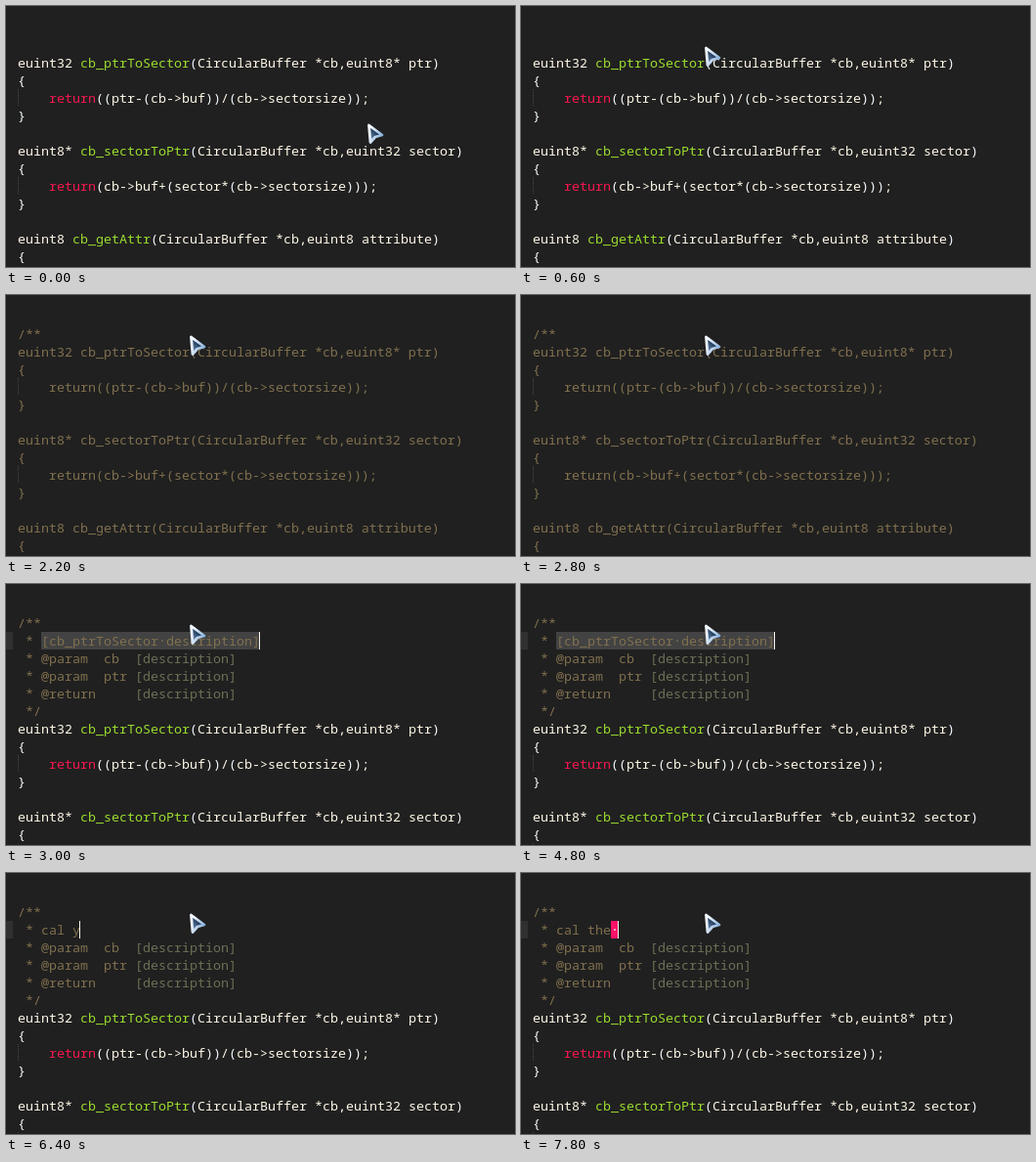
An HTML page for the animation above (8000 ms loop, 521 px wide and 267 px high).

```html
<!DOCTYPE html>
<html lang="en">
<head>
<meta charset="utf-8">
<title>Doc comment typing</title>
<style>
  html, body { margin: 0; width: 100%; height: 100%; overflow: hidden; background: #202020; }
  svg { display: block; width: 521px; height: 267px; }
  text {
    font: 13.3333px "Noto Sans Mono", "DejaVu Sans Mono", monospace;
    font-variant-ligatures: none;
    white-space: pre;
  }
</style>
</head>
<body>
<svg viewBox="0 0 521 267">
  <defs>
    <linearGradient id="rim" x1="0" y1="0.3" x2="1" y2="0.8">
      <stop offset="0.1" stop-color="#f3f8ff"/>
      <stop offset="1" stop-color="#7fa9d8"/>
    </linearGradient>
    <linearGradient id="core" x1="0.8" y1="0.2" x2="0.2" y2="1">
      <stop offset="0.2" stop-color="#0f2846"/>
      <stop offset="1" stop-color="#7d9fc6"/>
    </linearGradient>
  </defs>
  <rect width="521" height="267" fill="#202020"/>
  <g id="editor"></g>
  <g id="pointer">
    <path d="M2.5 2 L16 12 L9 14 L4 19.5 Z" fill="url(#core)"
      stroke="url(#rim)" stroke-width="2.8" stroke-linejoin="round"/>
  </g>
</svg>
<script>
const LOOP = 8000, LEFT = 12, TOP = 31, CHAR = 8, ROW = 18, BASELINE = 14;
const COLOR = {
  plain: '#fff8e8', bracket: '#f6fbff', name: '#9bdc2f', keyword: '#f9164f',
  comment: '#80704e', note: '#6c7056',
  select: '#434343', trailing: '#fc1268', guide: '#484848', gutter: '#303030'
};

const code = [
  'euint32 cb_ptrToSector(CircularBuffer *cb,euint8* ptr)',
  '{',
  '    return((ptr-(cb->buf))/(cb->sectorsize));',
  '}',
  '',
  'euint8* cb_sectorToPtr(CircularBuffer *cb,euint32 sector)',
  '{',
  '    return(cb->buf+(sector*(cb->sectorsize)));',
  '}',
  '',
  'euint8 cb_getAttr(CircularBuffer *cb,euint8 attribute)',
  '{'
];
const placeholder = '[cb_ptrToSector description]';
const docBlock = summary => [
  '/**',
  ' * ' + summary,
  ' * @param  cb  [description]',
  ' * @param  ptr [description]',
  ' * @return     [description]',
  ' */'
];

// Each step overrides the state left by the steps before it.
const steps = [
  { at: 0, pointer: [369, 120], head: '', doc: null, caret: 0, gutter: false },
  { at: 200, pointer: [202, 64] },
  { at: 400, pointer: [187, 48] },
  { at: 600, pointer: [187, 41] },
  { at: 800, caret: 1, gutter: true },
  { at: 1200, caret: 0 },
  { at: 1600, head: '/', caret: 1 },
  { at: 2200, head: '/**', caret: 0, gutter: false },
  { at: 2400, caret: 1 },
  { at: 2800, caret: 0 },
  { at: 3000, doc: placeholder, caret: 1, gutter: true },
  { at: 3200, caret: 0 },
  { at: 3400, caret: 1 },
  { at: 4000, caret: 0.5 },
  { at: 4200, caret: 0 },
  { at: 4800, caret: 1 },
  { at: 5400, doc: 'c' },
  { at: 5600, doc: 'ca' },
  { at: 5800, doc: 'cal' },
  { at: 6200, doc: 'cal ' },
  { at: 6400, doc: 'cal y' },
  { at: 7000, doc: 'cal ' },
  { at: 7200, doc: 'cal t' },
  { at: 7600, doc: 'cal the' },
  { at: 7800, doc: 'cal the ' }
];

const editor = document.getElementById('editor');
const pointer = document.getElementById('pointer');

const colX = col => LEFT + col * CHAR;
const rowY = row => TOP + row * ROW;
const escapeText = s => s.replace(/&/g, '&amp;').replace(/</g, '&lt;').replace(/>/g, '&gt;');
const rect = (x, y, w, h, fill, opacity = 1) =>
  `<rect x="${x}" y="${y}" width="${w}" height="${h}" fill="${fill}" opacity="${opacity}"/>`;
const spaceDot = (col, row, fill) => rect(colX(col) + 3, rowY(row) + 8, 2, 2, fill);
const guide = row =>
  `<path d="M${LEFT + 0.5} ${rowY(row)}v${ROW}" stroke="${COLOR.guide}" stroke-dasharray="1 1"/>`;

function tokenColor(token, isComment) {
  if (isComment) return token === '[description]' ? COLOR.note : COLOR.comment;
  if (token === 'return') return COLOR.keyword;
  if (token.startsWith('cb_')) return COLOR.name;
  return /[(){}]/.test(token) ? COLOR.bracket : COLOR.plain;
}

function drawLine(line, row, isComment) {
  let col = 0, out = '';
  const tokens = isComment
    ? line.split(/(\[description\])/)
    : line.split(/(cb_\w+(?=\()|return|[(){}]+)/);
  for (const token of tokens) {
    const text = token.trimStart();
    const start = col + token.length - text.length;
    if (text) {
      out += `<text x="${colX(start)}" y="${rowY(row) + BASELINE}" ` +
        `fill="${tokenColor(token, isComment)}">${escapeText(text)}</text>`;
    }
    col += token.length;
  }
  return out;
}

function drawEditor({ head, doc, caret, gutter }) {
  const inDoc = doc !== null;
  const header = inDoc ? docBlock(doc) : [head];
  const row = inDoc ? 1 : 0;
  const caretCol = header[row].length;
  let out = gutter ? rect(0, rowY(row), 7, ROW, COLOR.gutter) : '';

  if (doc === placeholder) {
    out += rect(colX(3), rowY(1), doc.length * CHAR, ROW, COLOR.select);
    out += spaceDot(3 + doc.indexOf(' '), 1, '#66604f');
  } else if (inDoc && doc.endsWith(' ')) {
    out += rect(colX(caretCol - 1), rowY(1), CHAR, ROW, COLOR.trailing);
    out += spaceDot(caretCol - 1, 1, '#f9a3bd');
  }

  const unclosed = head === '/**' && !inDoc;
  [...header, ...code].forEach((line, i) => {
    if (line.startsWith('    ')) out += guide(i);
    const isComment = unclosed || (inDoc && i < header.length);
    out += drawLine(line, i, isComment);
  });
  return out + rect(colX(caretCol) - 1, rowY(row), 1, ROW, '#f8f8f0', caret);
}

let shown = -1;
function render(time) {
  const t = time % LOOP;
  const count = steps.filter(step => step.at <= t).length;
  if (count !== shown) {
    shown = count;
    const state = Object.assign({}, ...steps.slice(0, count));
    editor.innerHTML = drawEditor(state);
    pointer.setAttribute('transform', `translate(${state.pointer})`);
  }
}

const began = performance.now();
function tick() {
  render(performance.now() - began);
  requestAnimationFrame(tick);
}
tick();
</script>
</body>
</html>
```
